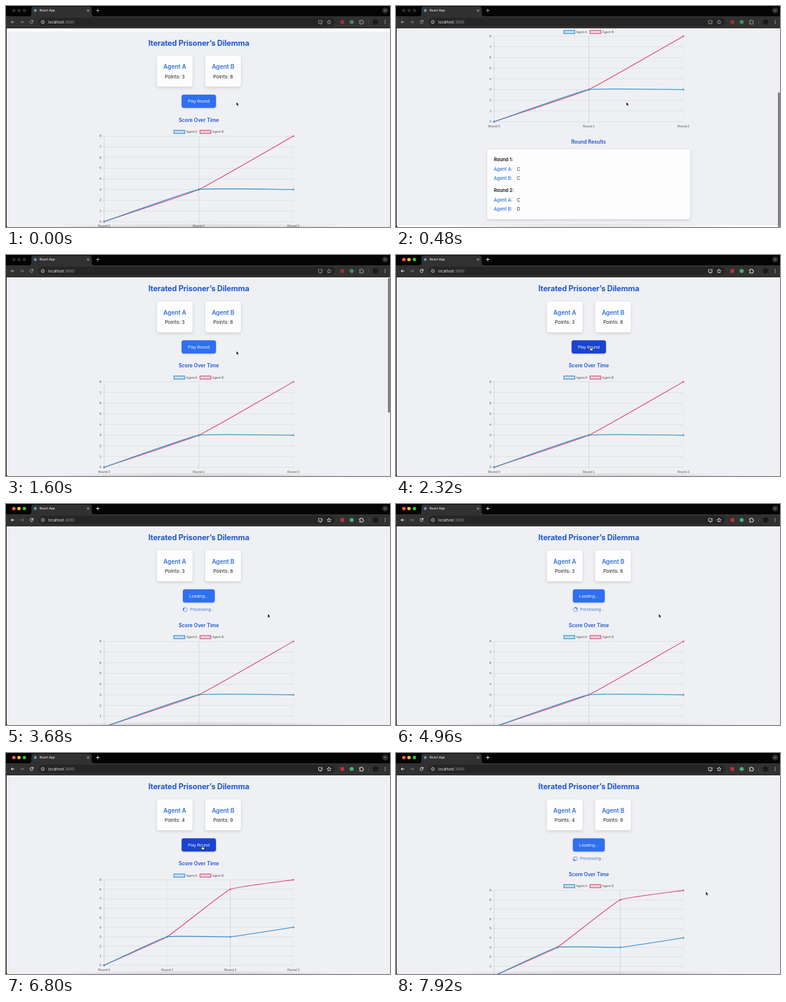
An HTML page that plays this animation: 636x366 px, repeating every 8 s.

```html
<!DOCTYPE html>
<html lang="en">
<head>
<meta charset="utf-8">
<title>Iterated Prisoner's Dilemma</title>
<style>
  html, body { margin: 0; width: 100%; height: 100%; overflow: hidden; background: #000; }
  svg { display: block; width: 636px; height: 366px; }
  text { font-family: Inter, "Open Sans", sans-serif; white-space: pre; }
  .plot text { font-family: "Liberation Sans", Arial, sans-serif; font-size: 5.3px; fill: #555; }
  .card { fill: #fdfdfe; filter: drop-shadow(0 2px 2.5px rgba(0, 0, 0, .13)); }
  .line { fill: none; stroke-width: 1; stroke-linecap: round; stroke-linejoin: round; }
</style>
</head>
<body>
<svg id="stage" viewBox="0 0 636 366" xmlns="http://www.w3.org/2000/svg"></svg>
<script>
const LOOP = 8000;
const LOADS = [[2750, 5335], [7180, LOOP]];
const UPDATE = 5335, UPDATE_LENGTH = 1000;
const FOCUS = 2080;
const VIEW_TOP = 36.6, PAGE_HEIGHT = 486.4, MAX_SCROLL = 157;
const LOADING_SHIFT = 17.5;
const PLOT = { left: 162.5, right: 476, top: 210, bottom: 351.5 };
const TENSION = 0.1;
const BLUE = '#3d97d3', PINK = '#dc5a7d';

const SCROLL = [[0, -5.5], [120, -2], [200, 15], [280, 75], [360, 130], [440, 156], [480, 160],
  [600, 158], [680, 157], [800, 150], [880, 105], [960, 50], [1040, 10], [1100, -4],
  [1200, -7.5], [1320, -4], [1440, -1], [1560, 0]];
const POINTER = [[0, 381.5, 159], [1850, 381.5, 159], [2180, 322, 152], [2780, 322, 152],
  [3320, 433.5, 182], [4700, 433.5, 182], [5400, 438.5, 182], [6300, 438.5, 182],
  [6850, 322, 153], [7240, 322, 153], [7860, 513, 229.5]];

const smooth = u => u * u * (3 - 2 * u);
const clamp = (v, lo, hi) => Math.min(hi, Math.max(lo, v));
const mix = (a, b, u) => a + (b - a) * u;

function track(keys, t, ease = u => u) {
  let i = keys.findIndex(k => k[0] > t);
  if (i < 0) return keys[keys.length - 1].slice(1);
  const a = keys[i - 1], b = keys[i];
  const u = ease((t - a[0]) / (b[0] - a[0]));
  return a.slice(1).map((v, n) => mix(v, b[n + 1], u));
}

// y is the middle of the capital letters
function label(x, y, size, fill, body, opt = '') {
  return `<text x="${x}" y="${y + size * 0.36}" font-size="${size}" fill="${fill}" ${opt}>${body}</text>`;
}
const MID = 'text-anchor="middle" ';
const bold = (weight, spacing = 0) => `font-weight="${weight}" letter-spacing="${spacing}"`;
const rect = (x, y, w, h, r, fill, opt = '') =>
  `<rect x="${x}" y="${y}" width="${w}" height="${h}" rx="${r}" fill="${fill}" ${opt}/>`;
const dot = (x, y, r, fill, opt = '') => `<circle cx="${x}" cy="${y}" r="${r}" fill="${fill}" ${opt}/>`;
const line = (d, stroke = 'currentColor', opt = '') => `<path class="line" d="${d}" stroke="${stroke}" ${opt}/>`;

function browser() {
  const bar = '#313132';
  return rect(0, 0, 636, VIEW_TOP, 0, '#040404')
    + `<path d="M38 17q4 0 4-4V5q0-4 4-4h92q4 0 4 4v8q0 4 4 4h490V${VIEW_TOP}H0V17z" fill="${bar}"/>`
    + [13, 21.5, 30.5].map(x => dot(x, 7.5, 2.8, '#2b2b2b', 'class="light"')).join('')
    + dot(48.5, 7.5, 2.4, '#4b9fc4')
    + label(55.5, 7.5, 5.2, '#e6e6e6', 'React App', bold(500))
    + line('M134.5 6l3 3m0-3l-3 3', '#e0e0e0', 'style="stroke-width:.8"')
    + dot(628, 7.5, 5, '#2c2c2d') + line('M626.5 6.8l1.5 1.5 1.5-1.5', '#d8d8d8', 'style="stroke-width:.8"')
    + rect(54, 19.5, 491, 14, 7, '#252526')
    + dot(61, 26.5, 4.2, '#363637') + dot(61, 26.5, 2.2, 'none', 'stroke="#ddd" stroke-width=".8"')
    + label(70, 26.5, 6.1, '#ececec', 'localhost<tspan fill="#9b9b9b">:3000</tspan>')
    + '<g id="icons">'
    + line('M152 5v5m-2.5-2.5h5')
    + line('M13.5 26.5h-5m2.2-2.2l-2.2 2.2 2.2 2.2')
    + line('M24 26.5h5m-2.2-2.2l2.2 2.2-2.2 2.2', '#7d7d7d')
    + line('M44.6 25.2a2.5 2.5 0 1 0 .2 2M44.8 23.6v1.8h-1.8')
    + line('M521 24h-3.4v4.6h6v-1.6M519.5 30h2.5M523 23.5v2.6m-1.2-1.1l1.2 1.2 1.2-1.2', undefined, 'style="stroke-width:.8"')
    + line('M535 23.4l1 2.1 2.3.3-1.7 1.6.4 2.3-2-1.1-2 1.1.4-2.3-1.7-1.6 2.3-.3z', undefined, 'style="stroke-width:.8"')
    + line('M585.8 24.4h1.7q0-1.4 1-1.4t1 1.4h1.7v1.8q1.3 0 1.3 1t-1.3 1v1.6h-5.4v-1.8q1.2-.2 1.2-1t-1.2-.9z')
    + '</g>'
    + '<g id="badges">' + rect(554, 23.6, 6, 6, 0.6, '#c2323b') + dot(572.5, 26.5, 3.3, '#43b36c') + '</g>'
    + rect(600, 23, 0.7, 7, 0, '#555') + dot(612, 26.5, 4.6, '#1a1a1b')
    + [24, 26.5, 29].map(y => dot(628, y, 0.75, '#cfcfcf')).join('');
}

function agentCard(x, name, id) {
  return rect(x, 77, 59, 51, 3.5, '', 'class="card"')
    + label(x + 29.5, 95, 9.9, '#3572d0', 'Agent ' + name, MID + bold(600, -0.05))
    + label(x + 29.5, 111.5, 8.1, '#202329', `Points: <tspan id="${id}"></tspan>`, MID);
}

function results() {
  let out = label(319, 384.5, 8.3, '#2256cd', 'Round Results', MID + bold(600))
    + rect(151, 397.5, 336, 115.5, 3.5, '', 'class="card"');
  [['C', 'C'], ['C', 'D']].forEach((moves, i) => {
    const y = 414 + i * 51;
    out += label(162, y, 7.8, '#15171c', `Round ${i + 1}:`, bold(600));
    moves.forEach((move, n) => {
      const row = y + 16 + n * 15.7;
      out += label(162, row, 7.5, '#3572d0', `Agent ${'AB'[n]}:`, bold(500))
        + label(200.3, row, 7.5, '#26292f', move);
    });
  });
  return out;
}

function legend(x, name, color) {
  return rect(x, 200.4, 18, 5.2, 0, color, `fill-opacity=".22" stroke="${color}" stroke-width="1.3"`)
    + `<text x="${x + 20.3}" y="204.9">Agent ${name}</text>`;
}

const stage = document.getElementById('stage');
stage.innerHTML = `
<defs>
  <clipPath id="view"><path d="M1 ${VIEW_TOP}H636V366H4q-3 0-3-3z"/></clipPath>
  <clipPath id="area"><rect x="161.5" y="208.8" width="316.5" height="144.2"/></clipPath>
  <radialGradient id="glow"><stop offset=".5" stop-color="#000" stop-opacity=".09"/>
    <stop offset="1" stop-color="#000" stop-opacity="0"/></radialGradient>
</defs>
<rect width="636" height="366" fill="#000"/>
<g clip-path="url(#view)">
  ${rect(0, VIEW_TOP, 636, 330, 0, '#fff')}
  <g id="page">
    ${rect(0, VIEW_TOP, 636, PAGE_HEIGHT, 0, '#eff0f3')}
    ${label(319.3, 55.5, 12.7, '#2058d2', 'Iterated Prisoner’s Dilemma', MID + bold(700, -0.15))}
    ${agentCard(250, 'A', 'scoreA')}${agentCard(330, 'B', 'scoreB')}
    <rect id="button" y="141.3" height="21.9" rx="3.6" style="filter:drop-shadow(0 1px 1.2px rgba(0,0,0,.14))"/>
    ${label(319.2, 152.5, 6.8, '#f4f7ff', '', MID + 'id="caption"')}
    <g id="busy">
      ${dot(297, 175, 3.2, 'none', 'stroke="#a9c4f3" stroke-width="1.7"')}
      <path id="spin" d="M293.8 175a3.2 3.2 0 0 1 3.2-3.2" fill="none" stroke="#3f78e4" stroke-width="1.7"/>
      ${label(305, 175, 6.5, '#3570d8', 'Processing...')}
    </g>
    <g id="lower">
      ${label(319.3, 183.2, 8.3, '#2256cd', 'Score Over Time', MID + bold(600))}
      <g class="plot">${legend(278, 'A', BLUE)}${legend(321.3, 'B', PINK)}<g id="chart"></g></g>
      ${results()}
    </g>
  </g>
  <ellipse cx="320" cy="367" rx="265" ry="7" fill="url(#glow)"/>
  <rect id="thumb" x="632.7" width="3" height="223" rx="1.5" fill="#6f7072"/>
</g>
${browser()}
<g id="pointer">
  <path id="arrow" d="M0 0v6.3l1.5-1.4 1 2.3 1.1-.5-1-2.2h2z" fill="#000" stroke="#fff" stroke-width=".6"/>
  <path id="hand" d="M-.2.2q.7-.9 1.3 0v2.1l2.4.5q.8.3.6 1.2l-.5 2.3H.3L-1.7 3.7q.3-.9 1.5 0z"
    fill="#fff" stroke="#000" stroke-width=".6"/>
</g>`;

const el = id => document.getElementById(id);
const put = (id, attrs) => { for (const k in attrs) el(id).setAttribute(k, attrs[k]); };
const show = (id, on) => put(id, { visibility: on ? 'visible' : 'hidden' });

function place(index, value, rounds, max) {
  return {
    x: PLOT.left + (PLOT.right - PLOT.left) * index / rounds,
    y: PLOT.bottom - (PLOT.bottom - PLOT.top) * value / max
  };
}

function control(pts, i) {
  const p = pts[Math.max(0, i - 1)], c = pts[i], n = pts[Math.min(pts.length - 1, i + 1)];
  const before = Math.hypot(c.x - p.x, c.y - p.y), after = Math.hypot(n.x - c.x, n.y - c.y);
  const near = TENSION * before / (before + after), far = TENSION * after / (before + after);
  const fit = y => clamp(y, PLOT.top, PLOT.bottom);
  return {
    inX: c.x - near * (n.x - p.x), inY: fit(c.y - near * (n.y - p.y)),
    outX: c.x + far * (n.x - p.x), outY: fit(c.y + far * (n.y - p.y))
  };
}

function series(scores, color, t) {
  const updated = t >= UPDATE;
  const u = 1 - (1 - clamp((t - UPDATE) / UPDATE_LENGTH, 0, 1)) ** 4;
  const pts = scores.slice(0, updated ? 4 : 3).map((score, i) => {
    const from = place(i, i < 3 ? score : 0, 2, 8);
    if (!updated) return from;
    const to = place(i, score, 3, 9);
    return { x: mix(from.x, to.x, u), y: mix(from.y, to.y, u) };
  });
  const ctl = pts.map((_, i) => control(pts, i));
  let d = `M${pts[0].x} ${pts[0].y}`;
  for (let i = 1; i < pts.length; i++) {
    const a = ctl[i - 1], b = ctl[i];
    d += `C${a.outX} ${a.outY} ${b.inX} ${b.inY} ${pts[i].x} ${pts[i].y}`;
  }
  return `<path d="${d}" fill="none" stroke="${color}" stroke-width="1.4" clip-path="url(#area)"/>`
    + pts.filter(p => p.x < PLOT.right + 1)
      .map(p => dot(p.x, p.y, 1.3, color, `fill-opacity=".5" stroke="${color}" stroke-width=".6"`)).join('');
}

function chart(t) {
  const rounds = t < UPDATE ? 2 : 3, max = t < UPDATE ? 8 : 9;
  let out = '';
  for (let v = 0; v <= max; v++) {
    const y = place(0, v, rounds, max).y;
    out += rect(158.8, y - 0.25, 317.4, 0.5, 0, '#cecfd2')
      + `<text x="157.8" y="${y + 1.9}" text-anchor="end">${v}</text>`;
  }
  for (let i = 0; i <= rounds; i++) {
    const x = place(i, 0, rounds, max).x;
    const faint = i === rounds || (rounds === 3 && i === 1);
    out += rect(x - 0.3, PLOT.top, 0.6, 145, 0, '#c4c5c8', faint ? 'opacity=".25"' : '')
      + `<text x="${x}" y="361" text-anchor="middle">Round ${i}</text>`;
  }
  return out + series([0, 3, 8, 9], PINK, t) + series([0, 3, 3, 4], BLUE, t);
}

function draw(t) {
  const [scroll] = track(SCROLL, t);
  const [px, py] = track(POINTER, t, smooth);
  const load = LOADS.find(([a, b]) => t >= a && t < b);
  const width = load ? 52.9 : 57;
  const over = Math.abs(px - 319.2) < width / 2 && py > 141 && py < 163;
  const active = t >= FOCUS;

  put('page', { transform: `translate(0 ${-scroll})` });
  put('lower', { transform: `translate(0 ${load ? LOADING_SHIFT : 0})` });
  put('button', { x: 319.3 - width / 2, width, fill: over && !load ? '#1a43d0' : '#2f70f0' });
  el('caption').textContent = load ? 'Loading...' : 'Play Round';
  show('busy', load);
  if (load) put('spin', { transform: `rotate(${(t - load[0]) * 0.36} 297 175)` });
  el('scoreA').textContent = t < UPDATE ? 3 : 4;
  el('scoreB').textContent = t < UPDATE ? 8 : 9;
  el('chart').innerHTML = chart(t);

  put('thumb', {
    y: 38 + clamp(scroll / MAX_SCROLL, 0, 1) * 105,
    opacity: t < 80 ? 0 : clamp((1950 - t) / 250, 0, 1)
  });
  put('icons', { color: active ? '#f0f0f0' : '#a3a3a3' });
  put('badges', { opacity: active ? 1 : 0.72 });
  document.querySelectorAll('.light').forEach((c, i) =>
    c.setAttribute('fill', active ? ['#ff5f57', '#febc2e', '#28c840'][i] : '#2b2b2b'));

  put('pointer', { transform: `translate(${px} ${py})` });
  show('hand', over);
  show('arrow', !over);
}

function tick() {
  draw(performance.now() % LOOP);
  requestAnimationFrame(tick);
}
tick();
</script>
</body>
</html>
```
